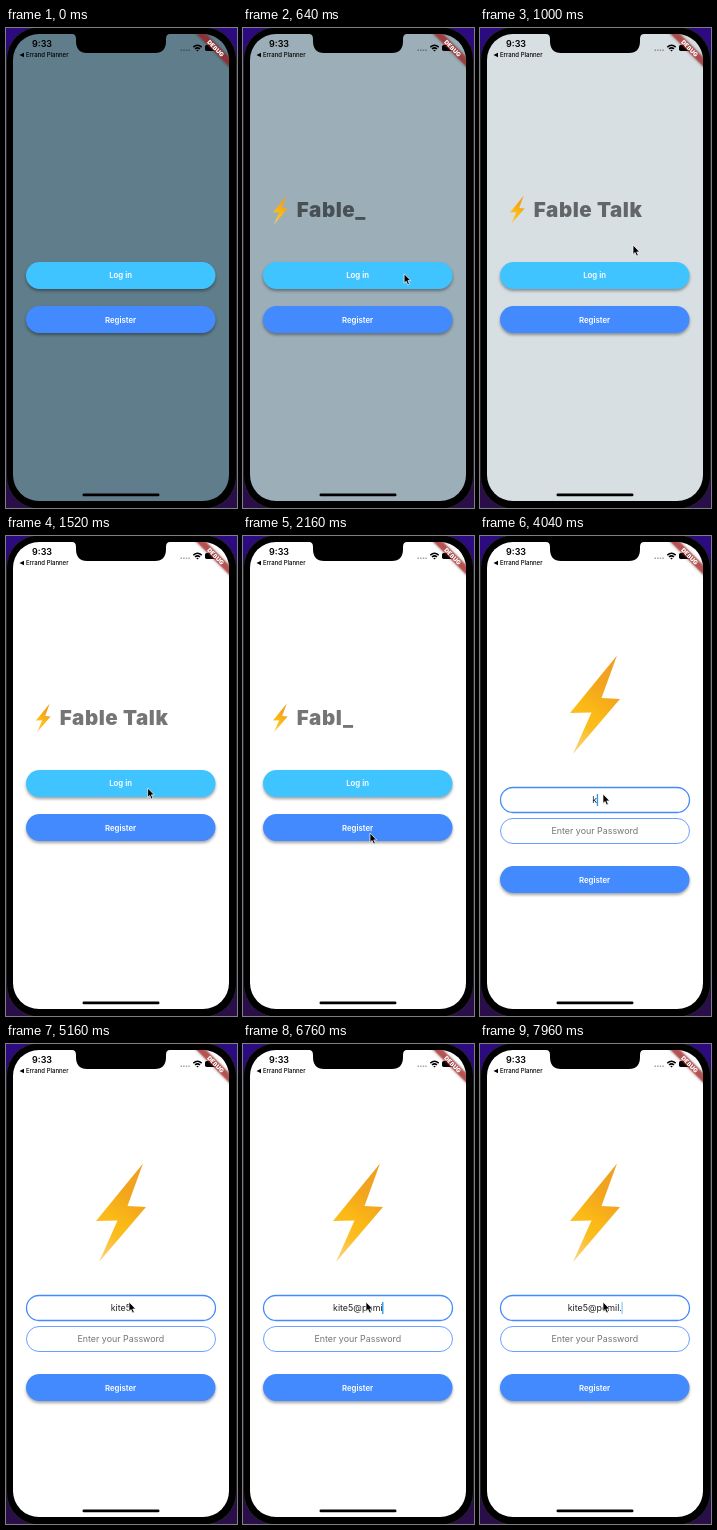
An HTML page that plays this animation: 231x480 px, repeating every 8000 ms.

```html
<!DOCTYPE html>
<html lang="en">
<head>
<meta charset="utf-8">
<title>Chat sign-up</title>
<style>
  html, body { margin: 0; width: 100%; height: 100%; overflow: hidden; background: #1d0b4c; }
  svg { display: block; width: 231px; height: 480px; font-family: Inter, Roboto, sans-serif; }
  .label { font-size: 7.8px; font-weight: 600; fill: #fff; text-anchor: middle; }
  .entry { font-size: 8.9px; fill: #212121; text-anchor: middle; }
  .hint { fill: #757575; }
  .button { filter: drop-shadow(0 2px 1.6px rgba(0, 0, 0, .36)); }
  .field { fill: #fff; stroke: #448aff; stroke-width: .8; }
</style>
</head>
<body>
<svg viewBox="0 0 231 480">
  <defs>
    <clipPath id="screen"><rect x="7" y="6" width="216" height="467" rx="26"/></clipPath>
    <linearGradient id="desk" x1="0" y1="0" x2="0" y2="1">
      <stop offset="0" stop-color="#2c0a80"/>
      <stop offset="1" stop-color="#2a0e48"/>
    </linearGradient>
    <linearGradient id="amber" x1=".7" y1="0" x2=".3" y2="1">
      <stop offset="0" stop-color="#f0a022"/>
      <stop offset=".3" stop-color="#f3a51d"/>
      <stop offset=".58" stop-color="#fbb916"/>
      <stop offset=".75" stop-color="#fbbd1f"/>
      <stop offset="1" stop-color="#fad071"/>
    </linearGradient>
  </defs>

  <rect width="231" height="480" fill="url(#desk)"/>
  <rect x=".5" y="-1" width="230" height="482" rx="33" stroke="#25212c"/>

  <g clip-path="url(#screen)">
    <rect id="back" x="7" y="6" width="216" height="467"/>

    <g id="welcome">
      <text id="title" x="53.8" y="189" font-size="20.5" font-weight="900" letter-spacing=".55" fill-opacity=".54"></text>
      <rect class="button" x="20" y="234" width="189.5" height="27" rx="13.5" fill="#40c4ff"/>
      <text class="label" x="114.6" y="250.4">Log in</text>
      <rect class="button" x="20" y="278" width="189.5" height="27" rx="13.5" fill="#448aff"/>
      <text class="label" x="114.6" y="294.5">Register</text>
    </g>

    <g id="signup">
      <rect id="email" class="field" x="20.5" y="251.5" width="189" height="25" rx="12.5"/>
      <text id="typed" class="entry" x="114.8" y="266.8"></text>
      <rect id="caret" y="258" width="1.4" height="12" fill="#2ba0f7"/>
      <rect class="field" x="20.5" y="282.5" width="189" height="25" rx="12.5"/>
      <text class="entry hint" x="114.8" y="297.8">Enter your Password</text>
      <rect class="button" x="20" y="330" width="189.5" height="27" rx="13.5" fill="#448aff"/>
      <text class="label" x="114.6" y="346.5">Register</text>
    </g>

    <path id="bolt" fill="url(#amber)" d="M22-49L-25 8.5L-3.5 8L-22 49.5L25-5.5L6.5-6.5Z"/>

    <text x="26" y="19.3" font-size="9" font-weight="600">9:33</text>
    <path d="M13.5 27L18 24.7V29.3Z"/>
    <text x="20" y="29.2" font-size="6" font-weight="500">Errand Planner</text>
    <path d="M174.5 22.3H184" stroke="#000" stroke-opacity=".35" stroke-width="1.5" stroke-dasharray="1.5 1.1"/>
    <g fill="none" stroke="#000" stroke-width="1.5">
      <path d="M187.3 19.1Q191.5 15.3 195.7 19.1"/>
      <path d="M189 21Q191.5 18.8 194 21"/>
    </g>
    <path d="M190.2 22.2Q191.5 21.2 192.8 22.2L191.5 23.6Z"/>
    <rect x="199" y="17" width="11.5" height="6" rx="1.7"/>
    <rect x="211" y="19" width="1" height="2" rx=".5" fill-opacity=".5"/>

    <g transform="translate(223 7) rotate(45)">
      <rect x="-40" y="15.5" width="80" height="6.8" fill="#b71c1c" fill-opacity=".63"
            style="filter: drop-shadow(0 0 1.4px rgba(0, 0, 0, .5))"/>
      <text y="21.1" text-anchor="middle" font-size="6" font-weight="900" fill="#fff">DEBUG</text>
    </g>
    <rect x="76.5" y="465.5" width="77" height="2.8" rx="1.4"/>
  </g>

  <path d="M66 5V6Q70 6 70 11V13Q70 25 81 25H149Q160 25 160 13V11Q160 6 164 6V5Z"/>
  <path id="pointer" stroke="#fff" stroke-width=".7" stroke-linejoin="round"
        d="M0 0V9.4L2.1 7.5L3.6 11L5.3 10.3L3.8 6.9H6.7Z"/>
</svg>

<script>
const LOOP = 8000;
const TITLE = "Fable Talk";
const ADDRESS = "kite5@pomil.";
const CHAR_MS = 30, BLINKS = 8, PAUSE = 1000, TITLE_START = 495;
const KEY_TIMES = [3900, 4080, 4240, 4400, 4640, 5500, 6340, 6480, 6600, 6720, 6980, 7500];
const FOCUS = 3160;
const POINTER = [
  [40, 168, 270], [320, 168, 270], [1000, 153, 217], [1150, 153, 217],
  [1960, 127, 297], [2840, 127, 297], [3120, 123, 258]
];

const $ = id => document.getElementById(id);
const [back, welcome, title, signup, email, typed, caret, bolt, pointer] =
  ["back", "welcome", "title", "signup", "email", "typed", "caret", "bolt", "pointer"].map($);

const clamp = v => Math.min(1, Math.max(0, v));
const span = (t, from, to) => clamp((t - from) / (to - from));
const mix = (a, b, p) => a + (b - a) * p;
const ease = p => p * p * (3 - 2 * p);

function titleAt(t) {
  if (t < TITLE_START) return "";
  const steps = TITLE.length + BLINKS;
  const at = (t - TITLE_START) % (steps * CHAR_MS + PAUSE);
  const n = Math.round(at / CHAR_MS);
  if (n === 0) return "";
  if (n <= TITLE.length) return TITLE.slice(0, n) + "_";
  const blink = n < steps && (n - TITLE.length) % 2 === 0;
  return TITLE + (blink ? "_" : "");
}

function pointerAt(t) {
  const next = POINTER.findIndex(key => key[0] > t);
  if (next < 0) return POINTER[POINTER.length - 1].slice(1);
  if (next === 0) return POINTER[0].slice(1);
  const [t0, x0, y0] = POINTER[next - 1], [t1, x1, y1] = POINTER[next];
  const p = ease(span(t, t0, t1));
  return [mix(x0, x1, p), mix(y0, y1, p)];
}

// Solid after each key press, then a soft blink once per second.
function caretAlpha(t, since) {
  if (t < FOCUS) return 0;
  const phase = (t - since) % 1000;
  return phase < 880 ? 1 - span(phase, 400, 520) : span(phase, 880, 1000);
}

function render(t) {
  const fade = span(t, 280, 1240);
  back.setAttribute("fill", `rgb(${[96, 125, 139].map(c => Math.round(mix(c, 255, fade)))})`);
  title.textContent = titleAt(t);

  const turn = ease(span(t, 2400, 2780));
  welcome.setAttribute("opacity", 1 - turn);
  signup.setAttribute("opacity", turn);
  bolt.setAttribute("opacity", t < 40 ? 0 : 1);
  bolt.setAttribute("transform",
    `translate(${mix(37.3, 115, turn)} ${mix(182, 168.5, turn)}) scale(${mix(.295, 1, turn)})`);

  const count = KEY_TIMES.filter(k => k <= t).length;
  typed.textContent = count ? ADDRESS.slice(0, count) : "Enter your email";
  typed.setAttribute("class", count ? "entry" : "entry hint");
  const half = count ? typed.getComputedTextLength() / 2 : 0;
  caret.setAttribute("x", 114.3 + half);
  caret.setAttribute("opacity", caretAlpha(t, count ? KEY_TIMES[count - 1] : FOCUS));
  email.style.strokeWidth = mix(.8, 1.3, span(t, 3220, 3420));

  pointer.setAttribute("opacity", t < 40 ? 0 : 1);
  pointer.setAttribute("transform", `translate(${pointerAt(t)})`);
}

const start = performance.now();
function tick() {
  render((performance.now() - start) % LOOP);
  requestAnimationFrame(tick);
}
tick();
</script>
</body>
</html>
```
